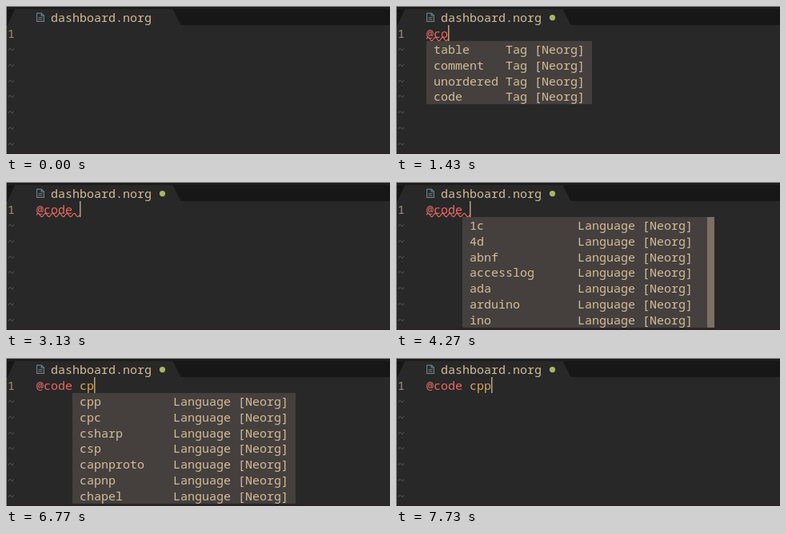
These frames come from a looping animation (480x186 px, 8 s). An HTML page:

```html
<!DOCTYPE html>
<html lang="en">
<head>
<meta charset="utf-8">
<title>Editor completion</title>
<style>
  html, body { margin: 0; width: 100%; height: 100%; overflow: hidden; background: #282828; }
  svg { display: block; width: 480px; height: 186px; }
  text { font: 15px "Noto Sans Mono", "DejaVu Sans Mono", monospace; white-space: pre; fill: #d4be98; }
  .tag { fill: #ea6962; }
  .arg { fill: #d8a657; }
  .num { fill: #a08f78; }
  .tilde { fill: #5a524c; }
  .picked { fill: #504945; }
  .curl { fill: none; stroke: #ea6962; stroke-width: 1.2; }
  .icon { fill: none; stroke: #6d8086; stroke-width: 1.1; }
</style>
</head>
<body>
<svg viewBox="0 0 480 186">
  <rect width="480" height="186" fill="#282828"/>
  <path d="M1 4H11L2 24H1ZM208.5 4H480V24H218.5Z" fill="#171717"/>
  <rect width="480" height="4" fill="#1d1e1c"/>
  <path d="M0 0H480V1H1V186H0Z" fill="#8a8a88"/>
  <text x="56" y="20">dashboard.norg</text>
  <path class="icon" d="M38.6 9.1H44.4L47.4 12.1V19.4H38.6ZM44.2 9.2V12.3H47.3M40.5 14.5H45.5M40.5 16.8H45.5"/>
  <g id="gutter"></g>
  <rect x="1" y="185" width="479" height="1" fill="#2a1f24"/>
  <g id="live"></g>
</svg>
<script>
const LOOP = 8000, CELL = 9, ROW = 19.85, LEFT = 38, TOP = 24;
const live = document.getElementById('live');

const menu = (items, kind, col, width, extra = {}) =>
  ({ items: items.split(' '), kind, col, width, pick: -1, ...extra });
const tags = menu('table comment unordered code', 'Tag', 0, 9);
const coTags = menu('comment code', 'Tag', 0, 7);
const allLangs = menu('1c 4d abnf accesslog ada arduino ino', 'Language', 5, 14, { bar: true, pad: 2 });
const cLangs = menu('c cpp cpc csharp csp capnproto capnp', 'Language', 5, 12, { bar: true });
const cpLangs = menu('cpp cpc csharp csp capnproto capnp chapel', 'Language', 5, 12);
const pick = (list, i) => ({ ...list, pick: i });

// Each step overrides part of the state before it.
const steps = [
  [0, { line: '', cursor: false, menu: null, curl: false, dirty: false }],
  [200, { cursor: true }],
  [700, { cursor: false }],
  [830, { line: '@', cursor: true, curl: true, dirty: true }],
  [930, { menu: tags }],
  [1300, { line: '@c' }],
  [1400, { line: '@co' }],
  [1500, { menu: coTags }],
  [2230, { line: '@comment', menu: pick(coTags, 0) }],
  [2700, { line: '@code', menu: pick(coTags, 1) }],
  [2970, { line: '@code ', menu: null }],
  [3170, { menu: allLangs }],
  [3700, { cursor: false }],
  [4200, { cursor: true }],
  [4670, { line: '@code c', curl: false }],
  [4800, { menu: cLangs }],
  [5500, { cursor: false }],
  [5730, { line: '@code cp', cursor: true }],
  [5870, { menu: cpLangs }],
  [6800, { line: '@code cpp', menu: pick(cpLangs, 0) }],
  [7470, { cursor: false }],
  [7670, { cursor: true, menu: null }]
];
let last = {};
const states = steps.map(([at, change]) => (last = { ...last, ...change, at }));

const text = (x, row, str, cls = '') =>
  `<text class="${cls}" x="${x}" y="${(TOP + 16 + row * ROW).toFixed(2)}">${str}</text>`;
const rect = (x, y, w, h, fill) =>
  `<rect x="${x}" y="${y}" width="${w}" height="${h}" fill="${fill}"/>`;

function drawCurl(cells) {
  const wave = 'q2.25 -4.4 4.5 0t4.5 0'.repeat(cells);
  return `<path class="curl" d="M${LEFT} 41.5${wave}"/>`;
}

function drawMenu({ items, kind, col, width, pick, bar, pad = 1 }) {
  const x = LEFT + col * CELL;
  const label = kind + ' [Neorg]';
  const w = (width + label.length + 2 + pad) * CELL;
  const y = TOP + 20, h = items.length * ROW;
  let out = rect(x, y, w, h, '#45403d');
  if (bar) out += rect(x + w, y, CELL, h, '#7c6f64');
  if (pick >= 0) out += rect(x, y + pick * ROW, w, ROW, '#a89984');
  items.forEach((name, i) => {
    out += text(x + CELL, i + 1, name.padEnd(width + 1) + label, i === pick ? 'picked' : '');
  });
  return out;
}

function draw({ line, cursor, menu, curl, dirty }) {
  const tag = line.slice(0, 5), arg = line.slice(6);
  const isTag = line.startsWith('@code');
  let out = text(LEFT, 0, isTag ? tag : line, 'tag');
  if (isTag && arg) out += text(LEFT + 6 * CELL, 0, arg, 'arg');
  if (curl) out += drawCurl(line.length);
  if (menu) out += drawMenu(menu);
  if (cursor) out += rect(LEFT + line.length * CELL, TOP, 1.5, 20, '#b5a283');
  if (dirty) out += '<circle cx="195.5" cy="14.6" r="3.6" fill="#a9b665"/>';
  live.innerHTML = out;
}

let gutter = text(2, 0, '1', 'num');
for (let row = 1; row < 8; row++) gutter += text(2, row, '~', 'tilde');
document.getElementById('gutter').innerHTML = gutter;

const start = performance.now();
let shown;
function tick() {
  const t = (performance.now() - start) % LOOP;
  const state = states.findLast(s => s.at <= t);
  if (state !== shown) draw(shown = state);
  requestAnimationFrame(tick);
}
tick();
</script>
</body>
</html>
```
